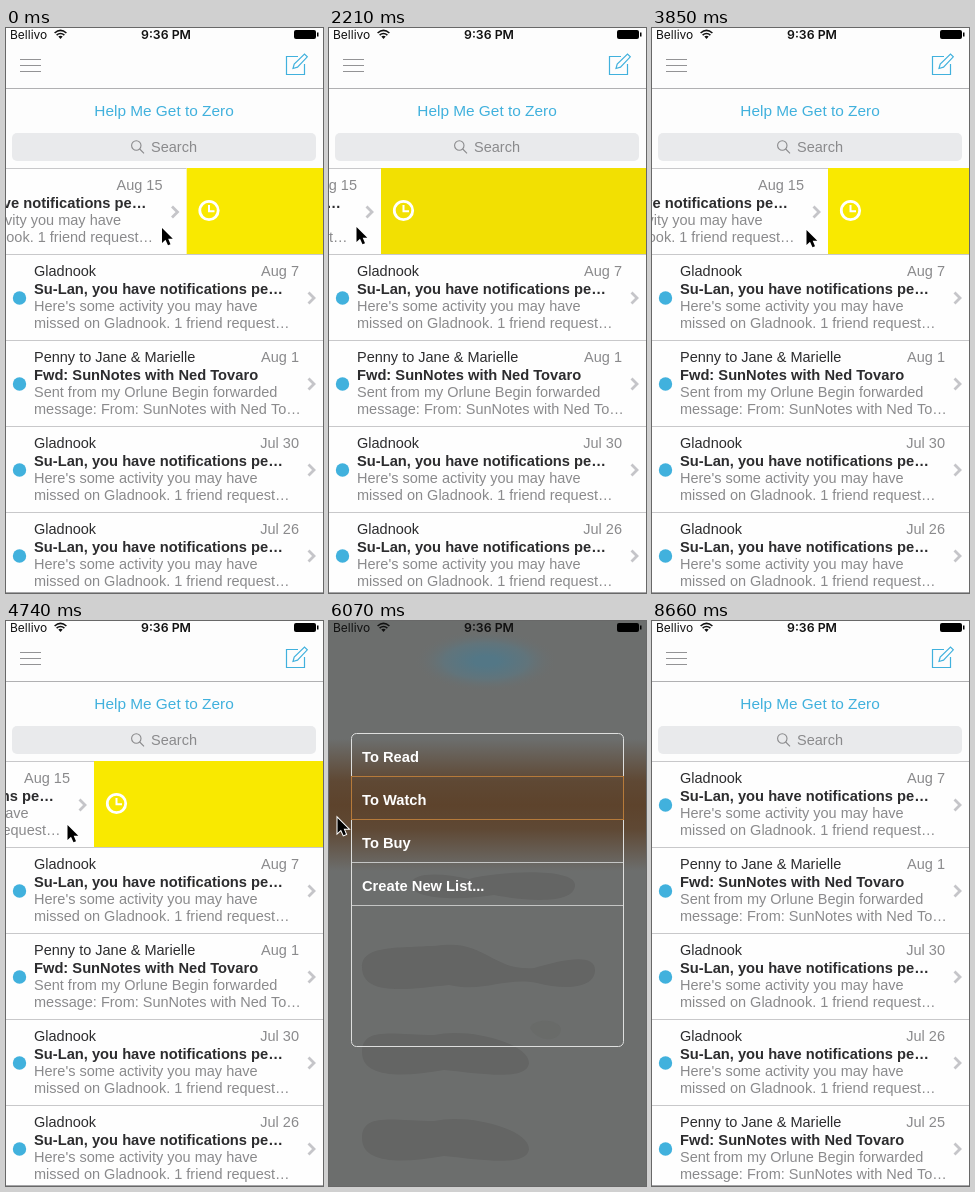
These frames come from a looping animation (317 px wide and 565 px high, 8.76 s). An HTML page with a canvas:

```html
<!DOCTYPE html>
<html lang="en">
<head>
<meta charset="utf-8">
<title>Mail swipe</title>
<style>
html, body { margin: 0; width: 100%; height: 100%; overflow: hidden; background: #fdfdfd; }
canvas { display: block; width: 317px; height: 565px; }
</style>
</head>
<body>
<canvas id="stage"></canvas>
<script>
const W = 317, H = 565, LOOP = 8760, STEP = 148, ROW = 86, TOP = 140;
const SANS = '"Liberation Sans", Arial, sans-serif';
const BODY = '14.5px ' + SANS, BOLD = 'bold 14.7px ' + SANS;
const BLUE = '#41b1dd', GREY = '#8a8a8c', INK = '#2c2c2e';

const canvas = document.getElementById('stage');
const ctx = canvas.getContext('2d');
const ratio = window.devicePixelRatio || 1;
canvas.width = W * ratio;
canvas.height = H * ratio;

const social = date => ({
  date, from: 'Gladnook', subject: 'Su-Lan, you have notifications pe…',
  lines: ["Here's some activity you may have", 'missed on Gladnook. 1 friend request…']
});
const forward = date => ({
  date, from: 'Penny to Jane & Marielle', subject: 'Fwd: SunNotes with Ned Tovaro',
  lines: ['Sent from my Orlune Begin forwarded', 'message: From: SunNotes with Ned To…']
});
const swiped = social('Aug 15');
const mails = [social('Aug 7'), forward('Aug 1'), social('Jul 30'), social('Jul 26'), forward('Jul 25')];

// Tracks: [step, value], linear between points
const EDGE = [[1, 180.5], [5, 120], [9, 120], [15, 52], [16, 50], [18, 50], [19, 42], [20, 42], [21, 85],
  [23, 180], [24, 180], [25, 179], [26, 176], [30, 104], [31, 104], [32, 88], [35, 33], [38, 33], [39, 0]];
const BROWN = [[14, 0], [15, .06], [16, 1], [20, 1], [21, .5], [22, 0], [33, 0], [34, .06], [35, 1]];
const GAP = [[24, 25], [26, 22], [30, 26], [31, 26], [32, 27], [35, 25]];
const POINTER_Y = [[9, 200], [15, 199], [20, 199], [23, 202], [26, 202], [30, 203], [31, 203], [32, 204],
  [35, 197], [46, 197], [47, 185], [48, 185], [49, 330], [50, 424], [53, 424], [54, 479]];
const POINTER_X = [[46, 8], [47, 60], [48, 60], [49, 100], [50, 126], [53, 126], [54, 169]];
const SHADE = [[39, 0], [40, .5], [41, 1], [47, 1], [48, .5], [49, 0]];
const COLLAPSE = [[50, 0], [52, 1]];

function at(track, k) {
  let a = track[0];
  for (const b of track) {
    if (k <= b[0]) return b[0] === a[0] ? b[1] : a[1] + (b[1] - a[1]) * (k - a[0]) / (b[0] - a[0]);
    a = b;
  }
  return a[1];
}

function text(s, x, y, font, color, align = 'left') {
  ctx.font = font;
  ctx.fillStyle = color;
  ctx.textAlign = align;
  ctx.fillText(s, x, y);
}
function rect(x, y, w, h, color) {
  ctx.fillStyle = color;
  ctx.fillRect(x, y, w, h);
}
function disc(x, y, r, color) {
  ctx.beginPath();
  ctx.arc(x, y, r, 0, 7);
  ctx.fillStyle = color;
  ctx.fill();
}
function stroke(path, color, width) {
  ctx.strokeStyle = color;
  ctx.lineWidth = width;
  ctx.stroke(new Path2D(path));
}
function fill(path, color) {
  ctx.fillStyle = color;
  ctx.fill(new Path2D(path));
}
function shifted(x, y, draw) {
  ctx.save();
  ctx.translate(x, y);
  draw();
  ctx.restore();
}

function mailRow(mail, x, y) {
  shifted(x, y, () => {
    rect(0, 0, W, ROW, '#fefefe');
    disc(13.5, 44, 6.7, BLUE);
    text(mail.from, 28, 22, BODY, INK);
    text(mail.date, 293, 22, BODY, GREY, 'right');
    text(mail.subject, 28, 39.5, BOLD, INK);
    mail.lines.forEach((s, i) => text(s, 28, 57 + 17 * i, BODY, GREY));
    stroke('M302.5 38.5l5.5 5.5l-5.5 5.5', '#c5c5c9', 2.8);
    rect(0, 0, W, 1, '#c8c8ca');
  });
}

function clockIcon() {
  stroke('M9.2 0A9.2 9.2 0 1 1 -9.2 0A9.2 9.2 0 1 1 9.2 0', '#fff', 2.8);
  stroke('M0 -5.5V.8H5.5', '#fff', 2);
}
function listIcon() {
  for (const y of [-6.5, 0, 6.5]) {
    disc(-10, y, 2, '#fff');
    rect(-6, y - 1.5, 18, 3, '#fff');
  }
}

function swipeRow(edge, brown, height) {
  ctx.save();
  ctx.beginPath();
  ctx.rect(0, TOP, W, height);
  ctx.clip();
  const mix = (a, b) => Math.round(a + (b - a) * brown);
  rect(edge, TOP, W - edge, ROW, `rgb(${mix(249, 139)},${mix(233, 86)},${mix(0, 38)})`);
  const list = brown > .5;
  shifted(edge + (list ? 20 : 22.5), TOP + 42.5, list ? listIcon : clockIcon);
  if (edge > 0) mailRow(swiped, edge - W, TOP);
  ctx.restore();
}

function header() {
  rect(0, 0, W, TOP, '#fdfdfd');
  for (const y of [31, 37, 43]) rect(14, y, 21, 1, '#939395');
  stroke('M292 28.5H280.5V46.5H298.5V36', BLUE, 1.2);
  stroke('M287 40.5l1.2 -4.5L298.5 26L301.3 28.8L291.5 39.2Z', BLUE, 1.2);
  rect(0, 60, W, 1, '#b0b0b2');
  text('Help Me Get to Zero', 158, 88, '15.4px ' + SANS, BLUE, 'center');
  ctx.beginPath();
  ctx.roundRect(6, 105, 304, 28, 5);
  ctx.fillStyle = '#e9eaec';
  ctx.fill();
  stroke('M135 117.5A4.7 4.7 0 1 1 125.6 117.5A4.7 4.7 0 1 1 135 117.5M133.7 121L138 125.3', GREY, 1.1);
  text('Search', 145, 124, BODY, GREY);
}

function statusBar() {
  text('Bellivo', 4, 10.5, '12px Inter, sans-serif', '#111');
  text('9:36 PM', 160, 10.5, '600 12.3px Inter, sans-serif', '#111', 'center');
  stroke('M48.6 5Q54.5 -.2 60.4 5M50.6 7.2Q54.5 3.8 58.4 7.2', '#111', 1.6);
  fill('M54.5 11l-2.2 -2.4q2.2 -1.6 4.4 0z', '#111');
  ctx.beginPath();
  ctx.roundRect(288, 2, 22, 9, 2);
  ctx.fillStyle = '#000';
  ctx.fill();
  rect(311, 4.5, 1.5, 4, '#000');
}

function blurredBack() {
  rect(0, 0, W, H, '#6c6e6d');
  shifted(157, 40, () => {
    ctx.scale(1, .43);
    const glow = ctx.createRadialGradient(0, 0, 12, 0, 0, 72);
    glow.addColorStop(0, '#537786');
    glow.addColorStop(.5, '#61747b');
    glow.addColorStop(1, '#6c6e6d00');
    disc(0, 0, 72, glow);
  });
  const blob = '#646564';
  fill('M82 264C82 250 115 252 140 258C170 250 246 246 246 264C246 284 195 280 165 274C130 280 82 278 82 264', blob);
  fill('M33 346C33 322 75 328 115 324C155 320 165 350 205 347C235 338 266 332 266 349C266 368 235 369 208 362' +
    'C175 356 155 372 120 364C80 368 33 376 33 346', blob);
  for (const y of [0, 86])
    shifted(0, y, () => fill('M33 431C33 405 65 414 105 414C140 406 200 422 200 442C198 460 155 453 115 449' +
      'C75 456 33 458 33 431', blob));
  fill('M201 407C205 396 232 398 232 409C230 422 208 421 201 407', '#696b69');
  const band = ctx.createLinearGradient(0, 118, 0, 250);
  band.addColorStop(0, '#5d432c00');
  band.addColorStop(.32, '#5d432ce0');
  band.addColorStop(.5, '#5d432c');
  band.addColorStop(.68, '#5d432ce0');
  band.addColorStop(1, '#5d432c00');
  rect(0, 118, W, 132, band);
}

function popup(alpha) {
  ctx.save();
  ctx.globalAlpha = alpha;
  blurredBack();
  ['To Read', 'To Watch', 'To Buy', 'Create New List...'].forEach((s, i) => {
    text(s, 33, 140.5 + 43 * i, BOLD, '#fff');
    rect(23, 155 + 43 * i, 271, 1, i < 2 ? '#b67a3a' : '#c4c5c4');
  });
  ctx.beginPath();
  ctx.roundRect(22.5, 112.5, 272, 313, 5);
  ctx.strokeStyle = '#dedfde';
  ctx.lineWidth = 1;
  ctx.stroke();
  rect(22, 155, 1, 44, '#b67a3a');
  rect(294, 155, 1, 44, '#b67a3a');
  ctx.restore();
}

function pointer(x, y) {
  shifted(x, y, () => {
    const arrow = 'M.5 0V15L4 11.8L6.5 17.3L9 16.2L6.7 10.8H11.3Z';
    stroke(arrow, '#fff', 2);
    fill(arrow, '#000');
  });
}

function draw(ms) {
  const k = Math.floor((ms % LOOP + 10) / STEP);
  const edge = at(EDGE, k), shade = at(SHADE, k), collapse = at(COLLAPSE, k);
  ctx.setTransform(ratio, 0, 0, ratio, 0, 0);
  header();
  const first = TOP + ROW * (1 - collapse);
  if (collapse < 1) swipeRow(edge, at(BROWN, k), first - TOP);
  mails.forEach((mail, i) => mailRow(mail, 0, first + ROW * i));
  rect(0, 564, W, 1, '#a5a5a7');
  if (shade > 0) popup(shade);
  statusBar();
  if (k < 55) pointer(k < 39 ? edge - at(GAP, k) : at(POINTER_X, k), at(POINTER_Y, k));
}

const start = performance.now();
function tick() {
  draw(performance.now() - start);
  requestAnimationFrame(tick);
}
tick();
</script>
</body>
</html>
```
